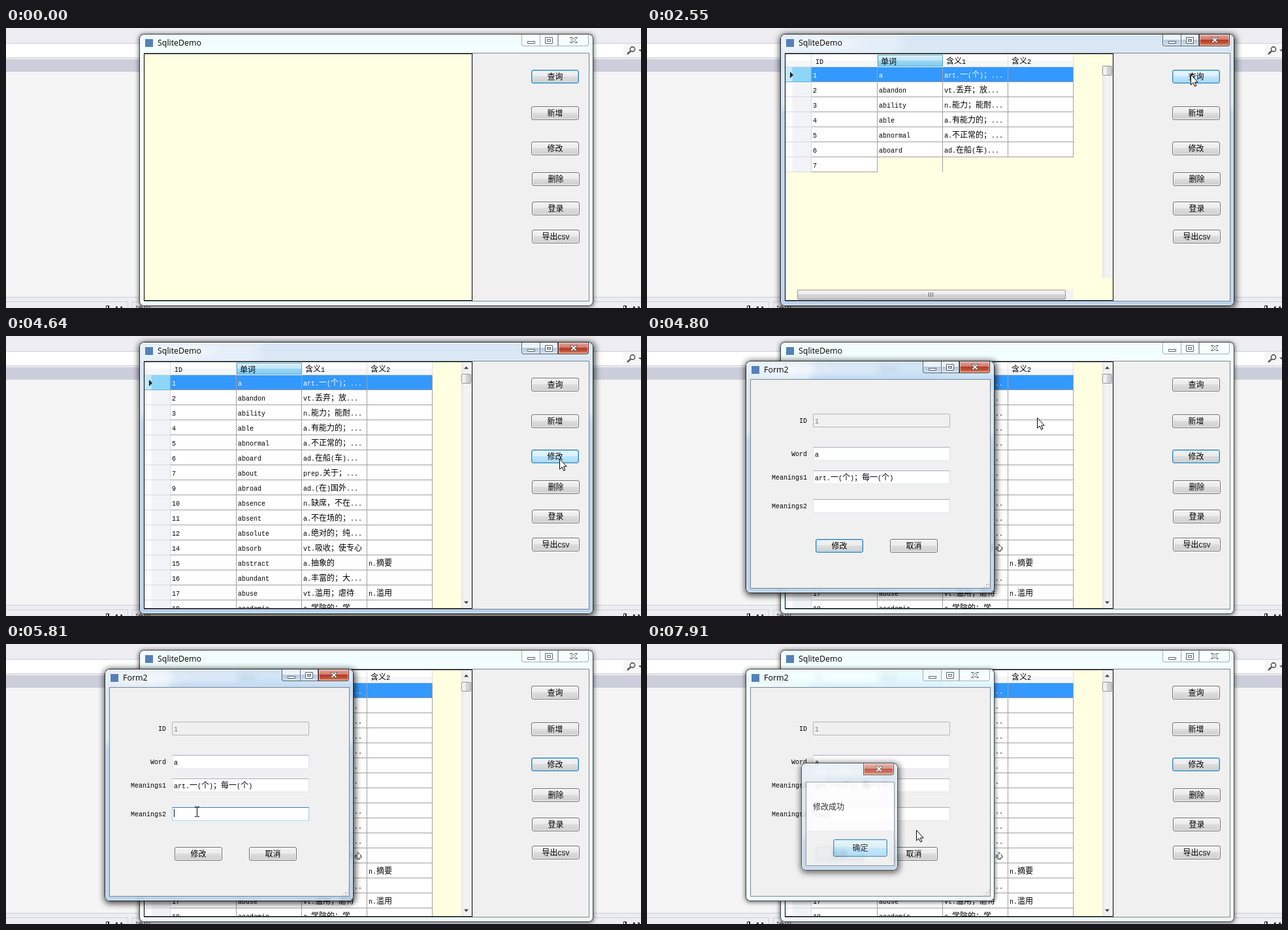
These frames come from a looping animation (972 by 429 pixels, 7.99 s). An HTML page:

```html
<!DOCTYPE html>
<html lang="zh-CN">
<head>
<meta charset="utf-8">
<title>SqliteDemo</title>
<style>
html, body { margin: 0; width: 100%; height: 100%; overflow: hidden; }
#stage {
  position: relative; width: 972px; height: 429px; overflow: hidden; background: #eeeef2;
  font: 12px "Noto Sans CJK SC", "Noto Sans CJK JP", sans-serif; color: #000;
}
#stage div { position: absolute; box-sizing: border-box; white-space: pre; }
#stage svg { position: absolute; overflow: visible; }
[hidden] { display: none !important; }
i { font: 10px/0 "Liberation Mono", monospace; }

/* window frames */
.win {
  border-radius: 7px; backdrop-filter: blur(3px); background: rgba(241, 255, 255, .86);
  box-shadow: inset 0 0 0 1px #3c4246, inset 0 0 0 2px rgba(255, 255, 255, .7), 0 1px 6px 1px rgba(0, 0, 0, .55);
}
.win.on {
  background:
    radial-gradient(ellipse 75px 15px at 62px 14px, rgba(255, 255, 255, .65), transparent),
    linear-gradient(100deg, rgba(255, 255, 255, .3) 25%, transparent 28%) 0 0 / 100% 29px no-repeat,
    linear-gradient(rgba(255, 255, 255, .42) 107px, transparent 123px),
    rgba(176, 205, 236, .8);
  box-shadow: inset 0 0 0 1px #1d2328, inset 0 0 0 2px rgba(255, 255, 255, .65), 1px 2px 10px 2px rgba(0, 0, 0, .7);
}
.client { background: #f0f0f0; border: 1px solid #7a848c; }
.title { font: 12.4px/20px "Open Sans", "Noto Sans", sans-serif; }
.icon { background: #5580b8; }
.cap { border: 1px solid #a3b1ba; border-top: 0; background: rgba(255, 255, 255, .35); }
.cap.first { border-radius: 0 0 0 4px; }
.cap.last { border-radius: 0 0 4px 0; }
.cap path { fill: #fff; stroke: #59636b; }
.on > .cap {
  border-color: #55616c; box-shadow: inset 0 0 0 1px rgba(255, 255, 255, .55);
  background: linear-gradient(rgba(240, 246, 252, .8) 48%, rgba(170, 190, 212, .75) 50%, rgba(205, 222, 240, .8));
}
.on > .cap.last {
  border-color: #5a2a26;
  background: linear-gradient(#e3aa9f, #cf7868 46%, #b4392a 50%, #c04f35 75%, #dd9468);
}

/* controls */
.btn {
  border: 1px solid #707070; border-radius: 3px; text-align: center; line-height: 18px;
  box-shadow: inset 0 0 0 1px rgba(255, 255, 255, .8);
  background: linear-gradient(#f3f3f3, #ebebeb 49%, #dddddd 50%, #cfcfcf);
}
.btn.focus { border-color: #3c7fb1; box-shadow: inset 0 0 0 1px #7fcdf0; }
.btn.hot { border-color: #3c7fb1; background: linear-gradient(#eaf6fd, #d9f0fc 49%, #bee6fd 50%, #a7d9f5); }
.btn.down {
  border-color: #2c628b; box-shadow: inset 1px 1px 1px #7fa9bf;
  background: linear-gradient(#e5f4fc, #c4e5f6 49%, #98d1ef 50%, #68b3db);
}
.label { text-align: right; line-height: 20px; }
.field {
  background: #fff; border: 1px solid; border-color: #abadb3 #dbdfe6 #e3e9ef #e2e3ea;
  border-radius: 1px; padding-left: 2px; line-height: 18px;
}
.field.off { background: #f0f0f0; border-color: #b4b4b4; border-radius: 2px; color: #777; }
.field.hot { border-color: #5794bf #b7d5ea #c7e2f1; }
.field.focus { border-color: #3d7bad #a4c9e3 #b7d9ed; }
.caret { background: #000; }
.grip {
  background: radial-gradient(circle at 1px 1px, #a9a9a9 1px, transparent 1.3px) 0 0 / 4px 4px;
  clip-path: polygon(100% 0, 100% 100%, 0 100%);
}

/* data grid */
.grid { background: #ffffe1; border: 1px solid #000; overflow: hidden; }
.head { background: linear-gradient(#fff 50%, #f5f6f8 51%); border: 1px solid #dcdee3; border-width: 0 1px 1px 0; line-height: 19px; padding-left: 5px; }
.head.sel { background: linear-gradient(#d9effb, #bfe5f8 48%, #9ad7f4 50%, #83cdf0); border: 1px solid #5aa5cf; padding-left: 4px; line-height: 17px; }
.stub { background: linear-gradient(90deg, #fdfdfe 10px, #f2f3f7 11px); border: 1px solid #d8dae0; border-width: 0 1px 1px 0; }
.cell { background: #fff; border: 1px solid #a0a0a0; border-width: 0 1px 1px 0; padding-left: 2px; line-height: 22px; overflow: hidden; }
.cur .cell { background: #39f; color: #fff; }
.cur .stub { background: linear-gradient(90deg, #c3e9fa 10px, #8dd6f7 11px); border-color: #6bb4da; }
.part .cell:nth-child(3) { background: none; border-bottom: 0; color: transparent; }
.part .cell:nth-child(n+4) { visibility: hidden; }
.bar { background: linear-gradient(90deg, #e6e6e6, #f2f2f2 30%); }
.thumb { border: 1px solid #979797; border-radius: 2px; background: linear-gradient(90deg, #f5f5f5, #e9e9eb 49%, #d6d6d9 50%, #cacace); }
.thumb.flat { background: linear-gradient(#f5f5f5, #e9e9eb 49%, #d6d6d9 50%, #cacace); }

.halo { border-radius: 50%; background: rgba(246, 228, 40, .72); }
</style>
</head>
<body>
<div id="stage"></div>
<script>
const LOOP = 7990;
const stage = document.getElementById('stage');
stage.ox = stage.oy = 0;

// Latin runs are half as wide as a Chinese character
const mix = s => s.replace(/[\x20-\x7e]+/g, '<i>$&</i>');

// Adds a box given in stage coordinates
function box(parent, cls, x, y, w, h, html = '') {
  const el = document.createElement('div');
  el.className = cls;
  el.style.cssText = `left:${x - parent.ox}px;top:${y - parent.oy}px;width:${w}px;height:${h}px`;
  el.innerHTML = html;
  parent.append(el);
  el.ox = x + el.clientLeft;
  el.oy = y + el.clientTop;
  el.rect = [x, y, w, h];
  return el;
}
const fill = (x, y, w, h, color) => { box(stage, '', x, y, w, h).style.background = color; };
const svg = (x, y, body) => `<svg style="left:${x}px;top:${y}px" width="1" height="1">${body}</svg>`;
const path = (d, attrs = '') => `<path d="${d}" ${attrs}/>`;
const button = (parent, x, y, text, w = 73, h = 21) => box(parent, 'btn', x, y, w, h, mix(text));

const GLYPHS = {
  min: path('M.5 .5h11v3h-11z'),
  max: path('M.5 .5h11v9h-11zM3.5 3.5v3h5v-3z', 'fill-rule="evenodd"'),
  close: path('M.5 .5h3.5l2 2.4 2-2.4h3.5l-3.7 4 3.7 4h-3.5l-2-2.4-2 2.4h-3.5l3.7-4z')
};

function makeWindow(x, y, w, h, top, title, right = 7) {
  const win = box(stage, 'win', x, y, w, h);
  const end = x + w - right;
  if (title) {
    box(win, 'icon', x + 9, y + 8, 12, 12);
    box(win, 'title', x + 28, y + 4, 120, 20, title);
    box(win, 'cap first', end - 103, y + 1, 29, 18, svg(8, 10, GLYPHS.min));
    box(win, 'cap', end - 75, y + 1, 28, 18, svg(7, 4, GLYPHS.max));
  }
  box(win, 'cap last', end - 47, y + 1, 47, 18, svg(17, 4, GLYPHS.close));
  box(win, 'client', x + 7, y + top, w - 7 - right + 1, h - top - 7);
  return win;
}

// Editor behind the windows
fill(0, 23, 972, 23, '#cccedb');
fill(0, 24, 972, 21, '#fff');
fill(945, 24, 27, 21, '#f6f6f6');
fill(0, 48, 972, 19, '#cccedb');
fill(0, 67, 972, 345, '#f5f5f5');
fill(0, 412, 972, 1, '#cccedb');
for (const [x, w] of [[-1, 188], [193, 790]]) {
  const panel = box(stage, '', x, 419, w, 20);
  panel.style.border = '1px solid #cccedb';
}
box(stage, '', 198, 422, 40, 18, '输出').style.color = '#444';
const pin = path('M1.5 5V.5h4V5M4.5 .5V5M0 4.5h7', 'fill="none" stroke="#1e1e1e"') +
  path('M16 2.5l4 4M26 2.5l-4 4M16 2.5h3M23 2.5h3', 'fill="none" stroke="#1e1e1e" stroke-width="1.3"');
for (const x of [152, 944]) box(stage, '', x, 425, 30, 4, svg(0, 0, pin));
box(stage, '', 950, 28, 22, 14, svg(0, 0,
  '<circle cx="9" cy="4.5" r="3.6" fill="none" stroke="#555" stroke-width="1.6"/>' +
  path('M6 7.5L1 12', 'stroke="#555" stroke-width="2.4"') + path('M18 5h6l-3 3z', 'fill="#555"')));

// Main window
const main = makeWindow(204, 9, 695, 417, 29, 'SqliteDemo');
const grid = box(main, 'grid', 211, 39, 503, 379);
const mainButtons = [
  [804, 64, '查询'], [804, 120, '新增'], [804, 174, '修改'],
  [805, 221, '删除'], [805, 266, '登录'], [805, 309, '导出CSV']
].map(b => button(main, ...b));

const table = box(grid, '', 212, 40, 441, 378);
box(table, 'head', 212, 40, 40, 20);
['ID', '单词', '含义1', '含义2'].forEach((name, i) =>
  box(table, i === 1 ? 'head sel' : 'head', 253 + 100 * i, 40 + (i === 1), 100, i === 1 ? 18 : 20, mix(name)));

const rows = [
  '1|a|art.一(个)；...|', '2|abandon|vt.丢弃；放...|', '3|ability|n.能力；能耐...|',
  '4|able|a.有能力的；...|', '5|abnormal|a.不正常的；...|', '6|aboard|ad.在船(车)...|',
  '7|about|prep.关于；...|', '9|abroad|ad.(在)国外...|', '10|absence|n.缺席，不在...|',
  '11|absent|a.不在场的；...|', '12|absolute|a.绝对的；纯...|', '14|absorb|vt.吸收；使专心|',
  '15|abstract|a.抽象的|n.摘要', '16|abundant|a.丰富的；大...|', '17|abuse|vt.滥用；虐待|n.滥用',
  '18|academic|a.学院的；学...|'
].map((line, n) => {
  const y = 60 + 23 * n;
  const row = box(table, n ? '' : 'cur', 212, y, 441, 23);
  box(row, 'stub', 212, y, 40, 23, n ? '' : svg(7, 7, path('M0 0l5 5-5 5z', 'fill="#222"')));
  line.split('|').forEach((s, i) => box(row, 'cell', 252 + 100 * i + (i > 0), y, i ? 100 : 101, 23, mix(s)));
  return row;
});

const vbar = box(grid, 'bar', 697, 40, 16, 377);
box(vbar, '', 701, 46, 9, 5, svg(0, 0, path('M0 4.5h7L3.5 .5z', 'fill="#444"')));
box(vbar, '', 701, 406, 9, 5, svg(0, 0, path('M0 .5h7L3.5 4.5z', 'fill="#444"')));
const partBar = box(grid, 'bar', 697, 57, 16, 326);
const vthumb = box(grid, 'thumb', 697, 58, 15, 15);
const hbar = box(grid, 'bar', 230, 401, 423, 16);
box(hbar, 'thumb flat', 230, 401, 411, 15, svg(200, 3, path('M.5 0v7M3.5 0v7M6.5 0v7', 'stroke="#666"')));

// Edit form
const form = makeWindow(151, 38, 381, 356, 28, 'Form2', 7);
box(form, 'grip', 515, 376, 9, 9);
const fields = [['ID', 119, '1'], ['Word', 170, 'a'], ['Meanings1', 206, 'art.一(个)；每一(个)'], ['Meanings2', 250, '']]
  .map(([name, y, text], i) => {
    box(form, 'label', 165, y - 1, 80, 21, mix(name));
    return box(form, i ? 'field' : 'field off', 254, y, 210, 21, mix(text));
  });
const typed = fields[3];
const caret = box(form, 'caret', 257, 253, 1, 12);
const formButtons = [button(form, 258, 311, '修改'), button(form, 372, 311, '取消')];

// Message box
const msg = makeWindow(236, 182, 148, 165, 29, '', 6);
msg.classList.add('on');
fill.call(null, 0, 0, 0, 0, 'none');
box(msg, '', 244, 212, 134, 74).style.background = '#fff';
box(msg, '', 254, 239, 80, 20, '修改成功').style.lineHeight = '20px';
button(msg, 285, 299, '确定', 83, 27).classList.add('focus', 'hot');
msg.querySelector('.btn').style.lineHeight = '24px';

// Pointer
const halo = box(stage, 'halo', 0, 0, 24, 24);
const arrow = box(stage, '', 0, 0, 12, 19, svg(0, 0,
  path('M.5 .5V16.2L4.1 12.9L6.6 18.4L8.9 17.4L6.5 12H11.2Z', 'fill="#fff" stroke="#000"')));
const beam = box(stage, '', 0, 0, 7, 16, svg(0, 0,
  path('M0 .5H3M4 .5H7M3.5 1V15M0 15.5H3M4 15.5H7', 'fill="none" stroke="#000"')));

// start, end, number of steps, target
const MOVES = [
  [70, 550, 7, 834, 73], [700, 700, 1, 832, 71],
  [3250, 4030, 11, 846, 171], [4090, 4240, 3, 847, 188],
  [4720, 4930, 4, 347, 62], [5100, 5330, 4, 306, 214],
  [5400, 5610, 4, 292, 257], [5970, 5970, 1, 292, 258],
  [6880, 7120, 4, 302, 316], [7360, 7520, 3, 412, 285]
];
const PRESSES = [[1400, 1540], [4580, 4640], [4930, 5020], [5700, 5810], [7200, 7280]];
const within = (t, [a, b]) => t >= a && t < b;
const count = (t, times) => times.filter(s => t >= s).length;
const smooth = p => p * p * (3 - 2 * p);

function pointer(t) {
  let x = 895, y = 423;
  for (const [a, b, n, tx, ty] of MOVES) {
    if (t < a) break;
    const k = a === b ? n : Math.min(n, Math.floor((t - a) / (b - a) * (n - 1) + 1e-6) + 1);
    const p = smooth(k / n);
    x += (tx - x) * p;
    y += (ty - y) * p;
  }
  return [Math.round(x), Math.round(y)];
}
const place = (el, x, y) => { el.style.left = x + 'px'; el.style.top = y + 'px'; };

function draw(t) {
  const [x, y] = pointer(t);
  const shown = t >= 70 && !within(t, [6570, 6880]);
  const down = PRESSES.some(p => within(t, p));
  const formOpen = t >= 4720;
  const over = el => {
    const [l, top, w, h] = el.rect;
    return shown && x >= l && x < l + w && y >= top && y < top + h;
  };
  const paint = (el, live, focus) => {
    const hot = live && over(el);
    el.classList.toggle('hot', hot);
    el.classList.toggle('down', hot && down);
    el.classList.toggle('focus', focus);
  };

  main.classList.toggle('on', within(t, [1400, 4720]));
  const focused = t < 4580 ? 0 : 2;
  mainButtons.forEach((b, i) => paint(b, !formOpen, i === focused));

  // the grid is painted in bursts
  const stageNo = count(t, [2320, 2400, 2550, 2650]);
  const visible = [0, 1, 3, 7, 16][stageNo];
  table.hidden = vthumb.hidden = !stageNo;
  rows.forEach((r, i) => {
    r.hidden = i >= visible;
    r.classList.toggle('part', stageNo === 3 && i === 6);
  });
  vbar.hidden = stageNo < 4;
  partBar.hidden = hbar.hidden = stageNo < 1 || stageNo > 3;

  form.hidden = !formOpen;
  const opening = t < 4790;
  form.style.opacity = opening ? .55 : 1;
  form.style.transform = opening ? 'scale(.96)' : 'none';
  const formLive = within(t, [4720, 7740]);
  form.classList.toggle('on', formLive);
  const typing = within(t, [5700, 7200]);
  fields.slice(1).forEach(f => paint(f, formLive, typing && f === typed));
  formButtons.forEach((b, i) => paint(b, formLive, !i && !typing));

  const chars = count(t, [6570, 6650, 6740, 6880]);
  typed.innerHTML = mix('test'.slice(0, chars));
  caret.hidden = !typing || within(t, [6190, 6570]);
  place(caret, 257 + 6 * chars - form.ox, 253 - form.oy);

  msg.hidden = t < 7820;
  msg.style.opacity = t < 7910 ? .4 : .8;

  const onField = formLive && fields.slice(1).some(over);
  halo.hidden = !down;
  arrow.hidden = !shown || onField;
  beam.hidden = !shown || !onField;
  place(halo, x - 13, y - 12);
  place(arrow, x, y);
  place(beam, x - 3, y - 8);
}

const start = performance.now();
function tick() {
  draw((performance.now() - start) % LOOP);
  requestAnimationFrame(tick);
}
tick();
</script>
</body>
</html>
```
